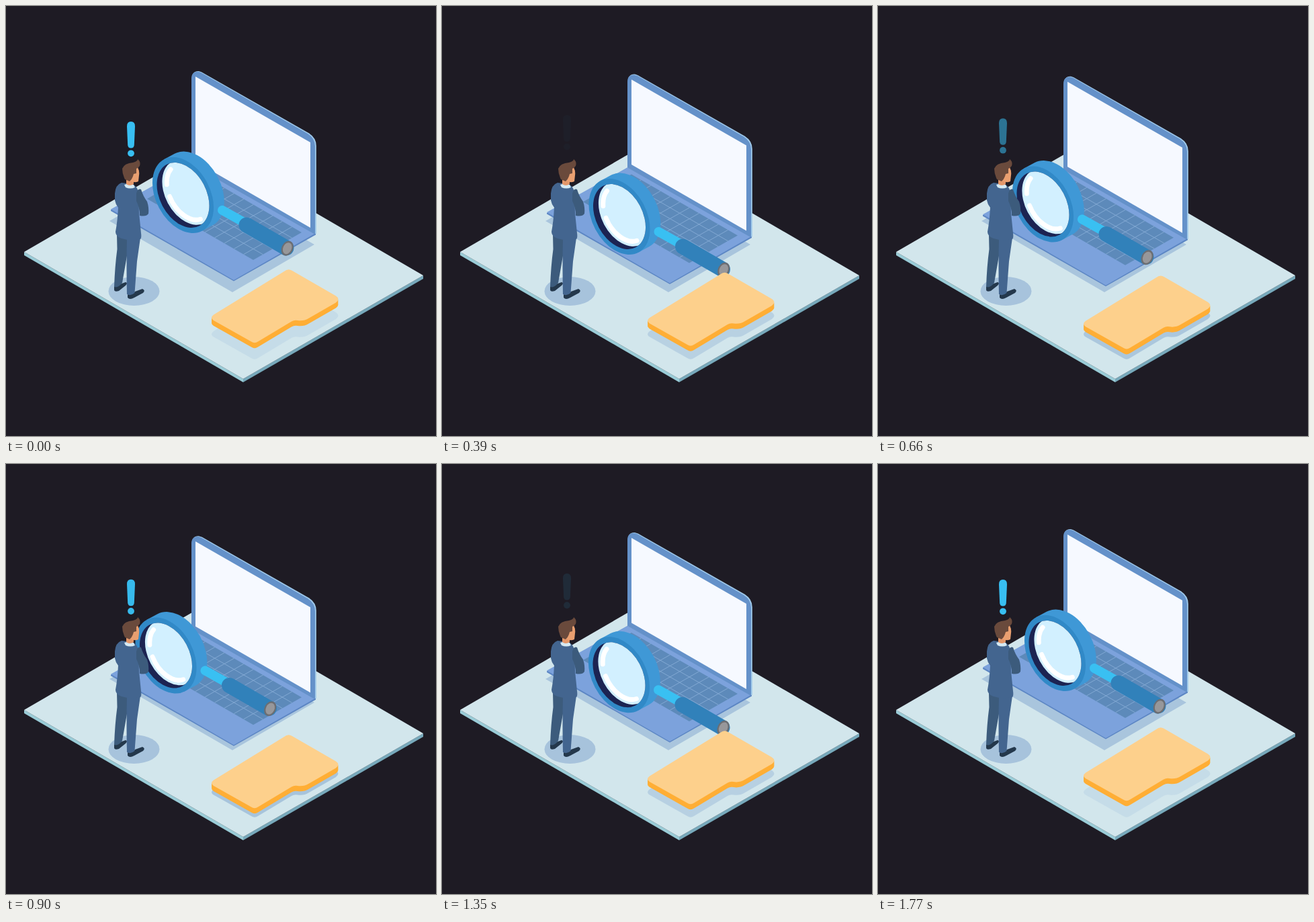
Animation of 640 by 640 pixels, one loop 1830 ms. Source, as an HTML page:

```html
<!DOCTYPE html>
<html lang="en">
<head>
<meta charset="utf-8">
<title>Search</title>
<style>
html, body { margin: 0; width: 100%; height: 100%; overflow: hidden; background: #1e1b24; }
svg { display: block; width: 100vw; height: 100vh; }
</style>
</head>
<body>
<svg viewBox="0 0 640 640">
  <defs>
    <path id="sheet" d="M309 459.500L414 395Q420 390 426 394L491 431.500Q498 436 491 441.500L451 464.500Q443 469.500 434 468Q429 467 425 469.500L375 499.500Q370 503 365 499.500L309 468Q303 464 309 459.500Z"/>
    <clipPath id="hole"><ellipse rx="34.600" ry="51.700"/></clipPath>
  </defs>

  <!-- floor -->
  <path fill="#9accd7" d="M27 366L353 555V560L27 371Z"/>
  <path fill="#77a9bb" d="M621 401L353 555V560L621 406Z"/>
  <path fill="#d2e6ec" d="M27 366L294.300 211L621 401L353 555Z"/>

  <!-- shadows -->
  <path fill="#a9c5dd" d="M154 320L276 250L459 355L337 426Z"/>
  <ellipse fill="#a7c3dc" cx="190.500" cy="424.500" rx="38" ry="21.500"/>
  <use id="shade" href="#sheet" y="24.500" fill="#a7c4dc"/>

  <g id="laptop">
    <path fill="#5c86c4" d="M156 303.500L276 236L461 339V340.500L339 409.500L156 305Z"/>
    <path fill="#7ca2dc" d="M156 302.500L276 236L461 338L339 408Z"/>
    <path fill="#5d8aba" d="M282 246L440 337L368 378L210 287Z"/>
    <path id="keys" fill="none" stroke="#86acd6" stroke-width=".9"/>
    <path fill="#9fc9ea" transform="translate(.8 -.8)" d="M276 236V108C276 99 283 95.500 291 99.500L450 190Q461 197 461 209V340Z"/>
    <path fill="#6491c9" d="M276 236V108C276 99 283 95.500 291 99.500L449 190Q460 197 460 209V340Z"/>
    <path fill="#f6f9ff" d="M282 105L453 203V330L282 231.500Z"/>
  </g>

  <g id="lens">
    <g transform="translate(263.500 281.500) rotate(-28)">
      <path fill="#3f98d6" d="M0 -60.300H17.900A40.400 60.300 0 0 1 17.900 60.300H0Z"/>
      <ellipse rx="40.400" ry="60.300" fill="#3189c7"/>
      <ellipse rx="34.600" ry="51.700" fill="#1c2452"/>
      <g clip-path="url(#hole)">
        <ellipse cx="9" rx="34.600" ry="51.700" fill="#d2f0ff"/>
      </g>
      <path id="glint" fill="none" stroke="#fff" stroke-width="7" stroke-linecap="round"/>
    </g>
    <g fill="none" stroke-linecap="round">
      <path stroke="#39c0f2" stroke-width="14" d="M322 304L356 323"/>
      <path stroke="#3181ba" stroke-width="23" d="M358 326L417 360"/>
    </g>
    <g transform="translate(418.700 360.700) rotate(25)">
      <ellipse rx="8.500" ry="11.500" fill="#6c6e73"/>
      <ellipse rx="6.300" ry="8.900" fill="#97979a"/>
    </g>
  </g>

  <g id="folder">
    <g fill="#ffae35">
      <use href="#sheet" y="2"/><use href="#sheet" y="4"/>
      <use href="#sheet" y="6"/><use href="#sheet" y="8"/>
    </g>
    <use href="#sheet" fill="#fdd08c"/>
  </g>

  <!-- man -->
  <g>
    <path fill="#24384c" d="M161 417Q164 420 170 414L178 411Q182 412 178 416L168 424Q161 426 161 422Z"/>
    <path fill="#24384c" d="M181 429Q186 431 192 425L203 421Q208 423 204 427L191 434Q184 438 181 434Z"/>
    <path fill="#3c5b7c" d="M165 340L183 344L180 372L173 412Q167 420 161 418Q162 388 165.500 362Z"/>
    <path fill="#43658f" d="M180 344L200 345L195 380L191.500 427Q186 432 180 429Q179 390 180 344Z"/>
    <path fill="#43658f" d="M172 263Q163 266 162 279V289Q163 295 167 300Q166 320 163 336Q163 343 172 346Q185 350 200 347Q202 345 201 338L198 308L197 276Q194 267 188 265Z"/>
    <path fill="#3c5b7c" d="M194 279Q196 271 201 273Q204 283 210 291Q213 300 212 309Q209 314 199 312Q199 300 194 290Z"/>
    <path fill="#d5eaf4" d="M176 266Q183 263 190 266L192 270Q185 273 178 270Z"/>
    <path fill="#e3976a" d="M179 257H190V265Q184 269 179 265Z"/>
    <path fill="#e99f70" d="M188 240H196Q199 246 198 252L197 261Q191 264 185 260Z"/>
    <path fill="#6a4a3c" d="M173 242Q176 234 189 233Q196 231 196 228Q201 232 199 238Q197 241 194 242V249L190 250Q188 258 184 261L177 258Q173 250 173 242Z"/>
  </g>

  <g id="alert" fill="#38bff2">
    <path d="M180 179Q180 172 186 172Q192 172 192 179L190.800 207Q190.300 211.500 186 211.500Q181.700 211.500 181.200 207Z"/>
    <circle cx="186" cy="219.300" r="4.900"/>
  </g>
</svg>
<script>
const LOOP = 1830, STEP = 30, END = 1770, HALF = END / 2;
const $ = id => document.getElementById(id);
const move = (id, x, y) => $(id).setAttribute('transform', `translate(${x} ${y})`);

// Keyboard grid, measured along its two edges.
const key = (u, v) => `${282 + 158 * u - 72 * v} ${246 + 91 * u + 41 * v}`;
let grid = '';
for (let i = 1; i < 5; i++) grid += `M${key(0, i / 5)}L${key(1, i / 5)}`;
for (let i = 1; i < 11; i++) grid += `M${key(i / 11, 0)}L${key(i / 11, 1)}`;
$('keys').setAttribute('d', grid);

// Reflections follow the edge of the glass.
const onGlass = deg => {
  const a = deg * Math.PI / 180;
  return `${9 + 28 * Math.cos(a)} ${44 * Math.sin(a)}`;
};
const arc = (a, b) => `M${onGlass(a)}A28 44 0 0 1 ${onGlass(b)}`;
$('glint').setAttribute('d', arc(96, 190) + arc(215, 255));

// time, x, y of the magnifier
const path = [
  [0, 0, 0], [240, 1.5, 18.5], [390, .5, 32], [465, -2.5, 32.5], [560, -9, 25.5],
  [660, -18, 13.5], [780, -24, 5], [900, -25.5, 3.5], [1030, -20, 11],
  [1170, -9.5, 24], [1290, -2, 32], [1380, .5, 31], [1530, 1.5, 18.5], [END, 0, 0]
];

function slope(i, k) {
  const a = path[i - 1], b = path[i + 1];
  return a && b ? (b[k] - a[k]) / (b[0] - a[0]) : 0;
}

function along(t, k) {
  let i = 0;
  while (i < path.length - 2 && t > path[i + 1][0]) i++;
  const a = path[i], b = path[i + 1], d = b[0] - a[0], p = (t - a[0]) / d, q = 1 - p;
  return a[k] * q * q * (1 + 2 * p) + b[k] * p * p * (3 - 2 * p)
    + d * p * q * (slope(i, k) * q - slope(i + 1, k) * p);
}

function alertLevel(t) {
  if (t < 400) return 1 - t / 400;
  if (t < HALF) return (t - 400) / (HALF - 400);
  if (t < 1400) return (1400 - t) / (1400 - HALF);
  return (t - 1400) / (END - 1400);
}

function draw() {
  const t = Math.min(END, Math.floor(performance.now() % LOOP / STEP) * STEP);
  const drop = 1 - Math.abs(t - HALF) / HALF;
  const ease = (1 - Math.cos(drop * Math.PI)) / 2;
  const level = alertLevel(t);
  move('laptop', 0, 10.3 * drop);
  move('folder', 0, 11 * ease);
  move('lens', along(t, 1), along(t, 2));
  move('alert', 0, -10 * (1 - level));
  $('alert').setAttribute('opacity', level);
  $('shade').setAttribute('opacity', .3 + .7 * ease);
  requestAnimationFrame(draw);
}
draw();
</script>
</body>
</html>
```
